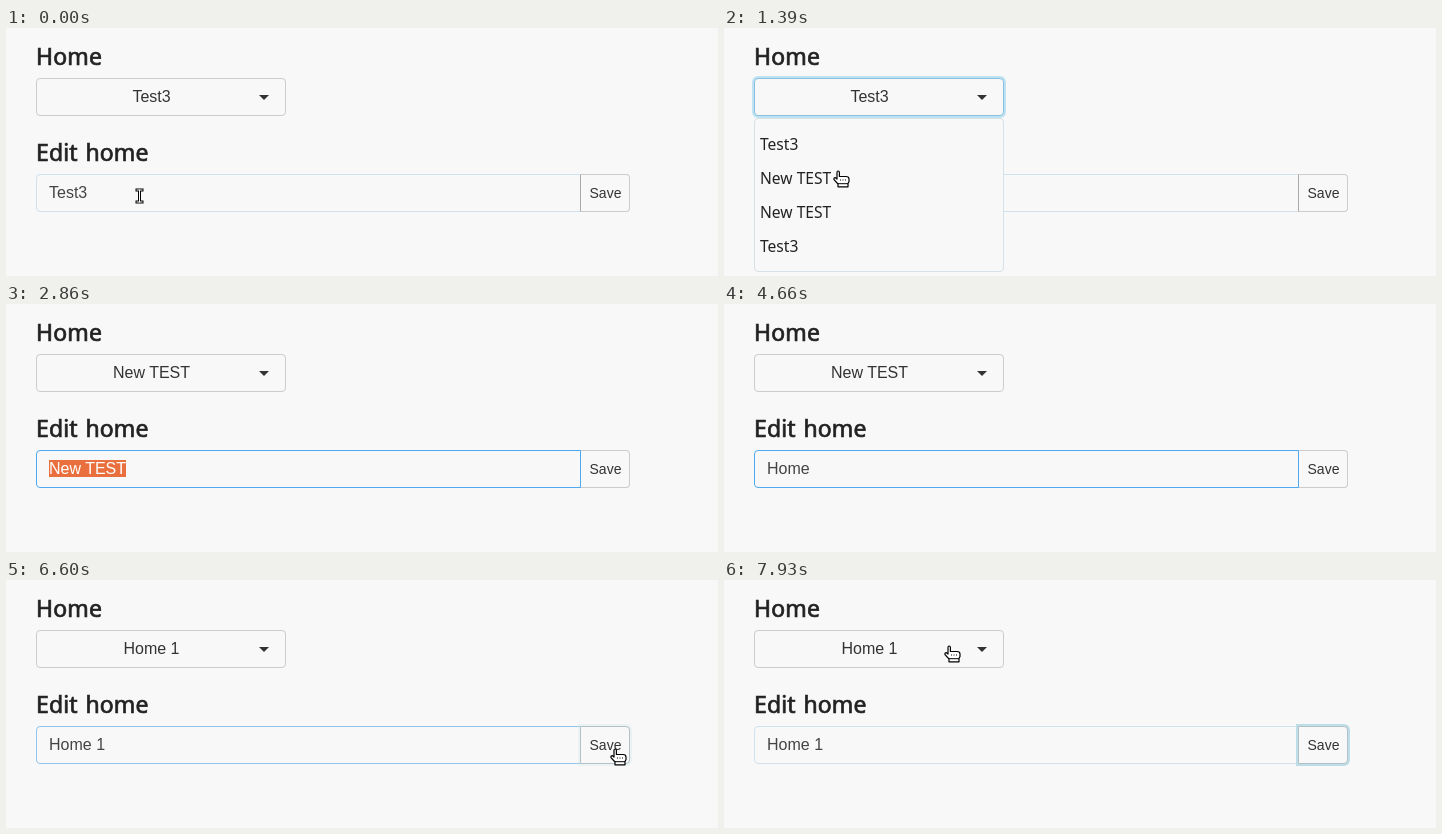
These frames come from a looping animation (712 by 248 pixels, 8 s). An HTML page:

```html
<!DOCTYPE html>
<html lang="en">
<head>
<meta charset="utf-8">
<title>Edit home</title>
<style>
  html, body { margin: 0; width: 100%; height: 100%; overflow: hidden; background: #f8f8f8; }
  #stage { position: relative; width: 712px; height: 248px; overflow: hidden; color: #222; white-space: pre; }
  #stage > * { position: absolute; box-sizing: border-box; }
  h2 { left: 30px; margin: 0; font: 500 23px/24px "Noto Sans", "Open Sans", sans-serif;
    letter-spacing: .15px; word-spacing: 1.5px; -webkit-text-stroke: .7px #222; }
  .box { height: 38px; border: 1px solid #ccc; font: 16px/36px "Liberation Sans", Arial, sans-serif; background: #f8f8f8; }
  #pick { left: 30px; top: 50px; width: 250px; padding-right: 19px; border-radius: 4px; text-align: center; color: #333; }
  #pick::after { content: ""; position: absolute; left: 222px; top: 16px; border: 5px solid transparent; border-top-color: #333; border-bottom: 0; }
  #pick.on { border-color: #86c0de; box-shadow: 0 0 0 2px #bfe3f3; }
  #field { left: 30px; top: 146px; width: 545px; padding-left: 12px; border-radius: 4px 0 0 4px; color: #444; }
  #save { left: 574px; top: 146px; width: 50px; padding-left: 1px; border-left-color: #aaa; border-radius: 0 4px 4px 0;
    font-size: 14px; text-align: center; color: #333; }
  #text { display: inline-block; line-height: 17px; }
  #text.sel { background: #e9703e; color: #fff; }
  #caret { display: inline-block; width: 1px; height: 17px; margin-right: -1px; vertical-align: -3px; background: #333; }
  #menu { left: 30px; top: 90px; width: 250px; height: 154px; padding: 8px 5px; border: 1px solid #d6e2e6; border-radius: 4px;
    background: #f8f8f8; font: 15.6px/34px "Noto Sans", "Open Sans", sans-serif; }
  #pointer { left: 0; top: 0; z-index: 2; overflow: visible; }
</style>
</head>
<body>
<div id="stage">
  <h2 style="top:16px">Home</h2>
  <div id="pick" class="box"></div>
  <h2 style="top:112px">Edit home</h2>
  <div id="field" class="box"><span id="text"></span><i id="caret"></i></div>
  <div id="save" class="box">Save</div>
  <div id="menu">Test3
New TEST
New TEST
Test3</div>
  <svg id="pointer" width="1" height="1" stroke-linejoin="round">
    <defs><path id="bar" d="M-2.5 -6H2.5M0 -6V6M-2.5 6H2.5" stroke-linecap="square"/></defs>
    <g id="ibeam" transform="translate(-.5 0)">
      <use href="#bar" stroke="#000" stroke-width="3"/>
      <use href="#bar" stroke="#fff"/>
    </g>
    <g id="hand" transform="translate(-6 -1)">
      <path d="M4 2.5Q4 1 5.2 1T6.4 2.5V6.5H13Q16 6.5 16 9V11.5L15 13.5V16.8H5V14L1 9.6Q.6 7.6 2.4 7.6L4 9Z" fill="#fff" stroke="#000" stroke-width="1.2"/>
      <path d="M7 10h1M9.5 10h1M12 10h1M5 13.7H15" stroke="#000"/>
    </g>
    <path id="arrow" d="M0 0V15L3.5 11.8L6 17L8.4 16L6 11H10.6Z" fill="#000" stroke="#fff"/>
  </svg>
</div>
<script>
const LOOP = 8000, STEP = 200 / 3;
const CHOOSE = 2000, FOCUS = 2460, SELECT = 2730, SAVE = 6530;
const name = "Home 1", keyTimes = [3730, 3790, 3930, 4060, 5130, 5260];
const el = id => document.getElementById(id);

// Pointer moves; bow bends the way downwards.
const home = { x: 134, y: 168 };
const moves = [
  { from: 60, to: 860, x: 196, y: 63, bow: -15 },
  { from: 930, to: 1460, x: 112, y: 146, bow: 0 },
  { from: CHOOSE, to: 2260, x: 152, y: 154, bow: 0 },
  { from: 5860, to: SAVE, x: 610, y: 169, bow: 40 },
  { from: 6730, to: 7930, x: 226, y: 66, bow: 80 }
];

const during = (t, a, b) => t >= a && t < b;
const clamp = u => Math.min(1, Math.max(0, u));
const ease = u => u * u * (3 - 2 * u);
const mix = (a, b, k) => `rgb(${a.map((c, i) => Math.round(c + (b[i] - c) * k))})`;
const show = (id, on) => { el(id).style.display = on ? "" : "none"; };
const inside = (p, l, t, r, b) => p.x >= l && p.x < r && p.y >= t && p.y < b;

function pointerAt(t) {
  let { x, y } = home;
  for (const m of moves) {
    const k = ease(clamp((t - m.from) / (m.to - m.from)));
    x += (m.x - x) * k;
    y += (m.y - y) * k + m.bow * Math.sin(Math.PI * k);
  }
  return { x: Math.round(x), y: Math.round(y) };
}

function pointerKind(p, open) {
  if (inside(p, 30, 50, 280, 88) || inside(p, 575, 146, 624, 184)) return "hand";
  if (open && inside(p, 30, 90, 280, 244)) return "hand";
  return inside(p, 30, 146, 575, 184) ? "ibeam" : "arrow";
}

function draw(t) {
  const typed = keyTimes.filter(k => k <= t);
  const open = during(t, 730, CHOOSE);
  const selected = during(t, SELECT, keyTimes[0]);
  const focused = during(t, FOCUS, SAVE);
  const before = t < CHOOSE ? "Test3" : "New TEST";
  el("pick").textContent = t < SAVE ? before : name;
  el("pick").classList.toggle("on", open);
  el("text").textContent = typed.length ? name.slice(0, typed.length) : before;
  el("text").classList.toggle("sel", selected);

  // The focus ring leaves the field as it grows on the button.
  const blur = clamp((t - SAVE + 30) / 200);
  el("field").style.borderColor = mix([79, 169, 238], [207, 226, 238], t < FOCUS ? 1 : blur);
  el("field").style.zIndex = focused ? 1 : 0;
  el("save").style.borderColor = blur ? "#b3c0c6" : "";
  el("save").style.boxShadow = `0 0 0 2px rgba(191,221,231,${blur * blur})`;

  const lastKey = typed.length ? typed[typed.length - 1] : FOCUS;
  show("caret", focused && !selected && Math.floor((t - lastKey) / 600) % 2 === 0);
  show("menu", open);

  const p = pointerAt(t), kind = pointerKind(p, open);
  ["hand", "ibeam", "arrow"].forEach(k => show(k, k === kind));
  show("pointer", !during(t, 2800, 5860));
  el("pointer").style.transform = `translate(${p.x}px, ${p.y}px)`;
}

const start = performance.now();
function tick() {
  const t = (performance.now() - start) % LOOP;
  // The screen refreshes fifteen times a second.
  draw(Math.floor(Math.floor((t + 10) / STEP) * STEP / 10 + 1e-6) * 10 % LOOP);
  requestAnimationFrame(tick);
}
tick();
</script>
</body>
</html>
```
